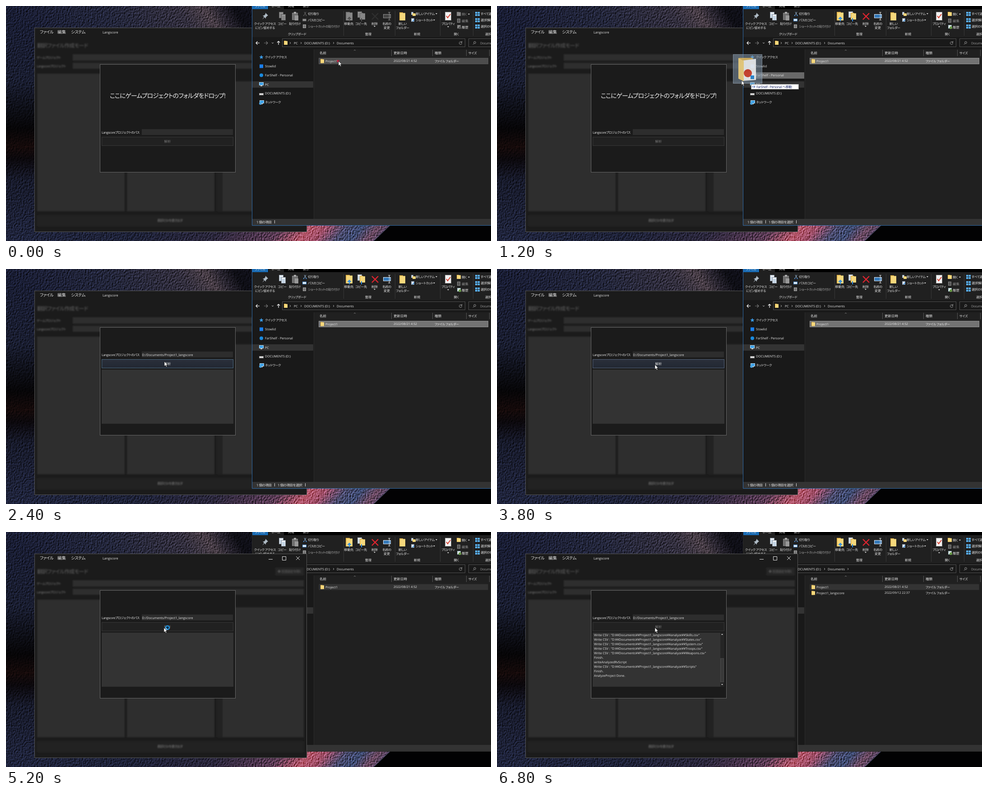
Recreate the animation shown at these times as an HTML page. Size 1075 by 521 pixels, loop 8 s.

```html
<!DOCTYPE html>
<html lang="ja">
<head>
<meta charset="utf-8">
<style>
html, body { margin: 0; width: 100%; height: 100%; overflow: hidden; background: #000; }
svg { display: block; width: 1075px; height: 521px; }
text { font-family: "Open Sans", "Noto Sans CJK JP", "Noto Sans CJK", sans-serif; font-feature-settings: "palt"; text-rendering: geometricPrecision; white-space: pre; }
.kana { letter-spacing: -.06em; }
.off { filter: grayscale(1) brightness(.62); }
</style>
</head>
<body>
<svg id="stage" viewBox="0 0 1075 521"></svg>
<script>
const LOOP = 8000, WHITE = '#e6e6e6', GRAY = '#8d8d8d';
const CLOUD = 'FarShelf - Personal', SYNC = 'Stowlid';
const stage = document.getElementById('stage');

const rect = (x, y, w, h, fill, more = '') => `<rect x="${x}" y="${y}" width="${w}" height="${h}" fill="${fill}" ${more}/>`;
const frame = (x, y, w, h, fill, stroke, more = '') => rect(x + .5, y + .5, w - 1, h - 1, fill, `stroke="${stroke}" ${more}`);
const path = (d, stroke = WHITE, width = 1, fill = 'none', more = '') => `<path d="${d}" stroke="${stroke}" stroke-width="${width}" fill="${fill}" ${more}/>`;
const shape = (d, fill) => path(d, 'none', 0, fill);
const dot = (x, y, r, fill, more = '') => `<circle cx="${x}" cy="${y}" r="${r}" fill="${fill}" ${more}/>`;
// y is the vertical middle of the line; kana is set tighter than Latin
const text = (x, y, s, size = 7.1, fill = WHITE, more = '') =>
  `<text x="${x}" y="${y + size * .36}" font-size="${size}" fill="${fill}" ${/[ぁ-ヿ]/.test(s) ? 'class="kana"' : ''} ${more}>${s}</text>`;
const mid = (x, y, s, fill = WHITE, size = 7.1, more = '') => text(x, y, s, size, fill, 'text-anchor="middle" ' + more);
const group = (id, body) => `<g id="${id}">${body}</g>`;
const down = (x, y) => shape(`M${x - 2} ${y - 1}h4l-2 2.4z`, WHITE);
const next = (x, y) => path(`M${x - 1} ${y - 2}l2 2l-2 2`, '#ccc', .9);
const folder = (x, y, w, h) => rect(x, y, w * .6, h, '#d9a93f') + rect(x + w * .1, y + h * .08, w * .9, h * .92, '#f6d87c');
const page = (x, y, w, h) => frame(x, y, w, h, '#e8edf2', '#8793a0') +
  path(`M${x + 2} ${y + h * .4}h${w - 4}m0 ${h * .2}h${4 - w}m0 ${h * .2}h${w - 4}`, '#6d9cc8', .8);

function wallpaper() {
  const stops = list => list.map(([o, c]) => `<stop offset="${o}" stop-color="${c}"/>`).join('');
  const gradient = (id, pos, list) => `<linearGradient id="${id}" gradientUnits="userSpaceOnUse" ${pos}>${stops(list)}</linearGradient>`;
  return `<defs>
    ${gradient('top', 'x1="0" y1="0" x2="545" y2="0" gradientTransform="skewX(32)"',
      [[0, '#191d34'], [.4, '#23263b'], [.7, '#332f3e'], [.8, '#493e47'], [.86, '#292530'], [.92, '#0e0e15'], [1, '#10101a']])}
    ${gradient('side', 'x1="0" y1="0" x2="0" y2="521"',
      [[0, '#191d34'], [.32, '#191d30'], [.45, '#0c0d14'], [.52, '#060507'], [.6, '#150a0a'], [.65, '#0b080c'], [.74, '#171a2b'], [1, '#20253e']])}
    ${gradient('low', 'x1="0" y1="0" x2="880" y2="0" gradientTransform="translate(0 487) skewX(-40)"',
      [[0, '#20253e'], [.35, '#1e2238'], [.55, '#2b273c'], [.7, '#5b3b55'], [.77, '#b5586c'], [.81, '#a0506a'], [.86, '#4a4b6d'], [.9, '#3d4a70'], [.94, '#6d4a62'], [1, '#30395c']])}
    <filter id="weave" x="0" y="0" width="1" height="1" color-interpolation-filters="sRGB">
      <feTurbulence type="fractalNoise" baseFrequency=".3 .24" numOctaves="3" seed="4"/>
      <feDiffuseLighting surfaceScale="1.3" lighting-color="#fff"><feDistantLight azimuth="225" elevation="30"/></feDiffuseLighting>
    </filter>
    <filter id="blur"><feGaussianBlur stdDeviation="1.7"/></filter>
    <linearGradient id="hot" x2="0" y2="1">${stops([[0, '#2a2f3a'], [1, '#222833']])}</linearGradient>
  </defs>` +
  rect(0, 0, 1075, 521, '#020203') +
  rect(0, 0, 700, 60, 'url(#top)') + rect(0, 40, 80, 481, 'url(#side)') +
  shape('M63 480H858L815 521H63z', 'url(#low)') +
  rect(0, 0, 1075, 521, '#fff', 'filter="url(#weave)" style="mix-blend-mode:overlay"') +
  shape('M858 480L815 521H1075V480z', '#020203') + path('M858 480L815 521', '#4a587c', .8);
}

function appWindow() {
  const panel = '#2e2e2e', dim = '#606060';
  const blurred = text(69, 88, '翻訳ファイル作成モード', 11.8, dim) +
    text(68, 114, 'ゲームプロジェクト', 7, '#808080') + text(68, 133, 'Langscoreプロジェクト', 7, '#808080') +
    rect(148, 107, 512, 14, panel) + rect(148, 126, 512, 13, panel) + rect(597, 79, 63, 17, '#252525') +
    mid(628, 87, '✚ 言語設定を開く', dim) + rect(69, 150, 194, 305, panel) + rect(268, 150, 194, 305, panel) +
    rect(467, 167, 13, 288, '#242424') + rect(480, 167, 180, 288, panel) +
    rect(69, 464, 591, 24, '#222') + mid(364, 475, '翻訳CSVを書き出す', '#777');
  return frame(63, 48, 604, 453, '#1b1b1b', '#555') +
    text(75, 58, 'ファイル', 9.4) + text(114, 58, '編集', 9.4) + text(144, 58, 'システム', 9.4) + text(214, 58.5, 'Langscore', 7.3) +
    path('M582 60.5h9M612.5 54.5h8v8h-8zM643 54l8 8m0-8l-8 8') +
    `<g filter="url(#blur)">${blurred}</g>` + dialog();
}

function dialog() {
  return frame(208, 129, 301, 240, '#1b1b1b', '#686868') +
    group('drop', mid(358, 199, 'ここにゲームプロジェクトのフォルダをドロップ!', '#f2f2f2', 13.8)) +
    group('form', text(212, 280, 'Langscoreプロジェクトのパス') + rect(301, 273, 202, 13, '#2d2d2d') +
      group('dest', text(301.5, 280, 'D:/Documents/Project1_langscore', 7.15)) +
      frame(212, 290, 292, 20, '#212121', '#383838', 'id="button"') +
      mid(358, 300, '解析', WHITE, 7.4, 'id="caption"')) +
    group('output', rect(212, 223, 292, 120, '#333') + group('log', ''));
}

function ribbon() {
  const tools =
    page(605, 13, 10, 14) + page(610, 18, 10, 14) +
    path('M661 13l4 7m0-7l-4 7', '#9ab8d6') + dot(660, 21, 1.2, '#4a90d9') + dot(665.5, 21, 1.2, '#4a90d9') +
    frame(657, 28, 9, 6, '#dfe8f2', '#4a90d9') +
    folder(753, 13, 15, 19) + path('M761 34v-9m-3.5 4l3.5-4l3.5 4', '#2b8ce6', 2) +
    page(779, 12, 10, 14) + folder(784, 15, 12, 15) + path('M788 34v-7', '#2b8ce6', 2) +
    path('M811 16l14 14m0-14l-14 14', '#e0242f', 2.4) +
    frame(836, 18, 17, 9, '#3479b8', '#dfe8f2') + path('M847 14h5m-2.5 0v17m-2.5 0h5') +
    folder(999, 13, 9, 9) + frame(1000, 42, 8, 8, '#e8edf2', '#8aa') + dot(1006, 48, 3, '#6b9c4b');
  const grid = y => [[0, 0], [5.5, 0], [0, 5], [5.5, 5]].map(([a, b]) => rect(1040 + a, y + b, 4.5, 4, '#58b0ee')).join('');
  const labels = [[574, 39, 'クイック アクセス'], [574, 48, 'にピン留めする'], [612, 39, 'コピー'], [640, 39, '貼り付け'],
    [760, 39, '移動先'], [787, 39, 'コピー先'], [817, 39, '削除'], [844, 39, '名前の'], [844, 48, '変更'], [879, 39, '新しい'],
    [879, 48, 'フォルダー'], [980, 39, 'プロパティ'], [645, 62, 'クリップボード'], [803, 62, '整理'], [911, 62, '新規'],
    [998, 62, '開く'], [1069, 62, '選択'], [598, 0, 'ホーム'], [632, 0, '共有'], [665, 0, '表示'], [563, 0, 'ファイル']];
  return rect(545, 0, 530, 7, '#000') + rect(546, 0, 35, 7, '#1a6cb5') + rect(582, 0, 34, 8, '#202020') + rect(546, 7, 529, 62, '#202020') +
    labels.map(l => mid(...l)).join('') +
    [748, 862, 962, 1035].map(x => rect(x, 11, 1, 55, '#383838')).join('') +
    shape('M575 15l6 6l-2 1l-3 3v3l-3-3l-5 5l4-6l-3-3h3l3-3z', '#aebac4') +
    frame(634, 15, 13, 16, '#6e6e6e', '#858585') + rect(638, 13, 5, 4, '#aaa') + rect(640, 21, 8, 11, '#999') +
    frame(658, 41, 7, 8, '#777', '#aaa') + text(669, 17, '切り取り') + text(669, 31, 'パスのコピー') +
    text(669, 45, 'ショートカットの貼り付け', 7.1, '#a8a8a8') + group('tools', tools) +
    down(817, 45) + folder(872, 14, 13, 18) + frame(898, 13, 5, 7, '#dde5ee', '#789') + folder(901, 16, 7, 6) +
    text(908, 17, '新しいアイテム') + down(954, 17) + frame(898, 27, 7, 8, '#dde5ee', '#789') + path('M901 34l4-4', '#2b8ce6', 1.4) +
    text(908, 31, 'ショートカット') + down(949, 31) + frame(973, 13, 14, 19, '#f2f2f2', '#999') + path('M976 22l3 4l6-8', '#d8402f', 2) + down(980, 46) +
    text(1010, 18, '開く', 7.1, WHITE, 'id="open"') + down(1026, 18) +
    frame(1000, 28, 7, 9, '#555', '#888') + text(1010, 33, '編集', 7.4, GRAY) + text(1010, 47, '履歴', 7.4) +
    grid(13) + grid(27) + grid(41) + text(1052, 17, 'すべて選択') + text(1052, 31, '選択解除', 7.4) + text(1052, 45, '選択の切り替え');
}

function addressBar() {
  return path('M562 82h-8m3.5-3.5L554 82l3.5 3.5M604 86v-8m-3 3l3-3l3 3', '#fff', 1.2) +
    path('M572 82h8m-3.5-3.5L580 82l-3.5 3.5', '#777', 1.2) + path('M589 81l2 2l2-2M984.5 81l2.5 2.5l2.5-2.5', '#ccc') +
    frame(612, 72, 406, 19, '#191919', '#505050') + folder(616, 77, 8, 9) +
    next(630, 82) + text(638, 82, 'PC') + next(654, 82) + text(661, 82, 'DOCUMENTS (D:)') + next(726, 82) + text(733, 82, 'Documents') +
    group('more', next(778, 82)) + path('M1010 80.5a3 3 0 1 0 .5 2M1010.5 78v3h-3', '#aaa', .9) +
    frame(1025, 72, 60, 19, '#191919', '#505050') + dot(1039, 81, 2.3, 'none', 'stroke="#999"') + path('M1037.5 83l-2.5 2.5', '#999') +
    text(1051, 82, 'Documentsの検索', 7.1, '#999');
}

function fileRow(y, name, date) {
  return folder(697, y - 4.5, 8, 9) + text(708, y, name) + text(859, y, date, 6.9) + text(950, y, 'ファイル フォルダー');
}

function explorer() {
  const screen = (x, y) => frame(x, y, 10, 7, '#3aa0e8', '#bfe0f5') + rect(x + 3, y + 7, 4, 2, '#bbb');
  return rect(545, 0, 530, 487, '#191919') + ribbon() + addressBar() + rect(683, 96, 392, 376, '#202020') + rect(682, 96, 1, 376, '#2b2b2b') +
    rect(546, 167, 135, 14, '#333') + rect(546, 147, 135, 14, '#696969', 'id="target"') +
    shape('M566 108.5l1.3 3.2l3.4.2l-2.6 2.2l.9 3.4l-3-1.9l-3 1.9l.9-3.4l-2.6-2.2l3.4-.2z', '#3a9be8') +
    text(574, 113, 'クイック アクセス') + rect(562, 129.5, 8, 8, '#1a7ff0') + text(574, 133, SYNC) + dot(566, 153.5, 4, '#1a8be0') + text(574, 153, CLOUD) +
    screen(561, 169) + text(574, 174, 'PC') + frame(561, 193, 10, 5, '#ddd', '#888') + text(574, 193.5, 'DOCUMENTS (D:)') +
    screen(562, 209) + dot(564, 216, 3, '#4aa3df') + text(574, 213.5, 'ネットワーク') +
    text(695, 104, '名前', 7.5) + text(859, 104, '更新日時', 7.5) + text(950, 104, '種類', 7.5) + text(1025, 104, 'サイズ') + path('M771 99l2-2l2 2', GRAY, .8) +
    [854, 945, 1020, 1071].map(x => rect(x, 97, 1, 14, '#555')).join('') +
    rect(693.5, 115.5, 375, 13, '#4d4d4d', 'id="row"') + fileRow(122, 'Project1', '2022/08/21 4:52') +
    group('created', fileRow(135, 'Project1_langscore', '2022/09/12 22:37')) +
    rect(545, 472, 530, 14, '#333') +
    group('status', text(555, 479, '1 個の項目', 7.6) + rect(595, 475, 1, 7, '#ddd') +
      group('picked', text(602, 479, '1 個の項目を選択', 7.6) + rect(663, 475, 1, 7, '#ddd'))) +
    path('M545.5 0V486.5H1075', '#2f6cab', 1, 'none', 'id="edge"');
}

function overlay() {
  const tip = (id, w, body) => group(id, frame(40, 66, w, 12, '#fff', '#8a8a8a') + body);
  return group('ghost',
      frame(0, 0, 65, 65, '#8295aa', '#a9b9ca', 'fill-opacity=".55" stroke-opacity=".6"') +
      `<g opacity=".88">${shape('M14 8h30v46h-30z', '#d9b25a') + shape('M22 14l29-4v47l-29 2z', '#eef0f2') +
        dot(33, 42, 9, '#cf3b25') + rect(39, 47, 8, 8, '#2383cf') + shape('M12 8l12 7v45l-12-6z', '#f3d27c')}</g>`) +
    group('tips',
      tip('move', 106, path('M42 72h7m-3-3l3 3l-3 3', '#2a4fa8') + text(52, 72, CLOUD + ' へ移動', 7.4, '#1d2a6b')) +
      tip('copy', 33, path('M43 72h7m-3.5-3.5v7', '#1d3f9a', 1.4) + text(53, 72, 'コピー', 6.6, '#1d2a6b'))) +
    dot(736, 122, 2.6, '#c2183a', 'id="press"') +
    group('cursor', path('M0 0V10.5L2.5 8.2L4.2 12L6 11.2L4.3 7.5H7.5z', '#111', .7, '#fff')) +
    group('busy', dot(0, 0, 4, '#0c2c48', 'stroke="#1f8fd8" stroke-width="2.4"') + path('M0-4a4 4 0 0 1 4 4', '#8fd4ff', 2));
}

stage.innerHTML = wallpaper() + group('app', appWindow()) + group('files', explorer()) + group('overlay', overlay());
const $ = id => document.getElementById(id);
const show = (id, on) => $(id).setAttribute('display', on ? 'inline' : 'none');
const set = (id, attrs) => Object.entries(attrs).forEach(([k, v]) => $(id).setAttribute(k, v));
const at = (keys, t) => keys.filter(k => k[0] <= t).pop();

// time, x, y
const cursorKeys = [[0, 737, 122], [400, 734, 123], [600, 718, 131], [800, 668, 148], [1000, 598, 160], [1200, 542, 165], [1400, 465, 140],
  [1600, 381, 192], [1800, 355, 204], [2000, 351, 205], [3200, 350, 208], [3400, 350, 212]];
const ghostKeys = [[600, 688, 70], [800, 638, 87], [1000, 574, 100], [1200, 523, 107], [1400, 435, 79], [1600, 351, 131], [1800, 325, 143], [2000, 317, 147]];
const logKeys = [[0, 0], [6200, 7], [6400, 14], [6800, 19]];

const csv = name => `Write CSV : "D:¥¥Documents¥¥Project1_langscore¥¥analyze¥¥${name}"`;
const logLines = ['writeAnalyzedBasicData',
  ...'Actors Animations Armors Classes CommonEvents Enemies Items MapInfos Skills States System Troops Weapons'.split(' ').map(n => csv(n + '.csv')),
  'Finish.', 'writeAnalyzedRvScript', csv('Scripts'), 'Finish.', 'AnalyzeProject Done.'];

function drawLog(count) {
  const first = Math.max(0, count - 10);
  let out = logLines.slice(first, count).map((s, i) => text(215, 228 + i * 10.1, s, 7.03)).join('');
  if (first) {
    const size = 1010 / Math.max(count, 18);
    out += rect(495, 223, 9, 120, '#252525') + frame(495, 333 - size, 8, size, '#393939', '#4a4a4a') +
      shape('M497 228h4l-2-2.5zM497 337h4l-2 2.5z', '#ddd');
  }
  $('log').innerHTML = out;
}

function draw(t) {
  const dropped = t >= 2400, front = t >= 4400, working = t >= 4600, selected = t >= 200;
  const [, cx, cy] = at(cursorKeys, t), ghost = !dropped && at(ghostKeys, t);
  stage.insertBefore($('app'), $(front ? 'overlay' : 'files'));

  $('tools').classList.toggle('off', !selected);
  set('open', { fill: selected ? WHITE : GRAY });
  set('row', front ? { fill: '#333', stroke: 'none' } : selected ? { fill: '#737373', stroke: '#929292' } : { fill: '#4d4d4d', stroke: '#555' });
  set('edge', { stroke: front ? '#2a2a2a' : '#2f6cab' });
  show('target', t >= 1200 && t < 1400);
  show('picked', selected);
  show('status', !front);
  show('created', t >= 5600);
  show('more', t >= 6400);

  show('drop', !dropped);
  show('dest', dropped);
  show('output', dropped);
  set('form', { transform: `translate(0 ${dropped ? -90 : 0})` });
  const live = dropped && !working;
  set('button', { fill: live ? 'url(#hot)' : '#212121', stroke: live ? (t < 2800 ? '#4c6a82' : '#55647c') : '#383838' });
  set('caption', { fill: live ? WHITE : '#777' });
  drawLog(at(logKeys, t)[1]);

  show('ghost', ghost);
  show('tips', ghost);
  if (ghost) for (const id of ['ghost', 'tips']) set(id, { transform: `translate(${ghost[1]} ${ghost[2]})` });
  show('move', t >= 1200 && t < 1400);
  show('copy', t >= 1400);
  show('press', t < 400);
  set('cursor', { transform: `translate(${cx} ${cy})` });
  show('busy', t >= 4800 && t < 6200);
  // the ring halts between bursts of work
  const turn = Math.min(t, 5200) + Math.max(0, Math.min(t, 5800) - 5400);
  set('busy', { transform: `translate(358 212) rotate(${turn * .45})` });
}

// the screen refreshes every 200 ms
let last = -1;
function tick(now) {
  const t = Math.floor(now % LOOP / 200) * 200;
  if (t !== last) draw(last = t);
  requestAnimationFrame(tick);
}
tick(performance.now());
</script>
</body>
</html>
```
